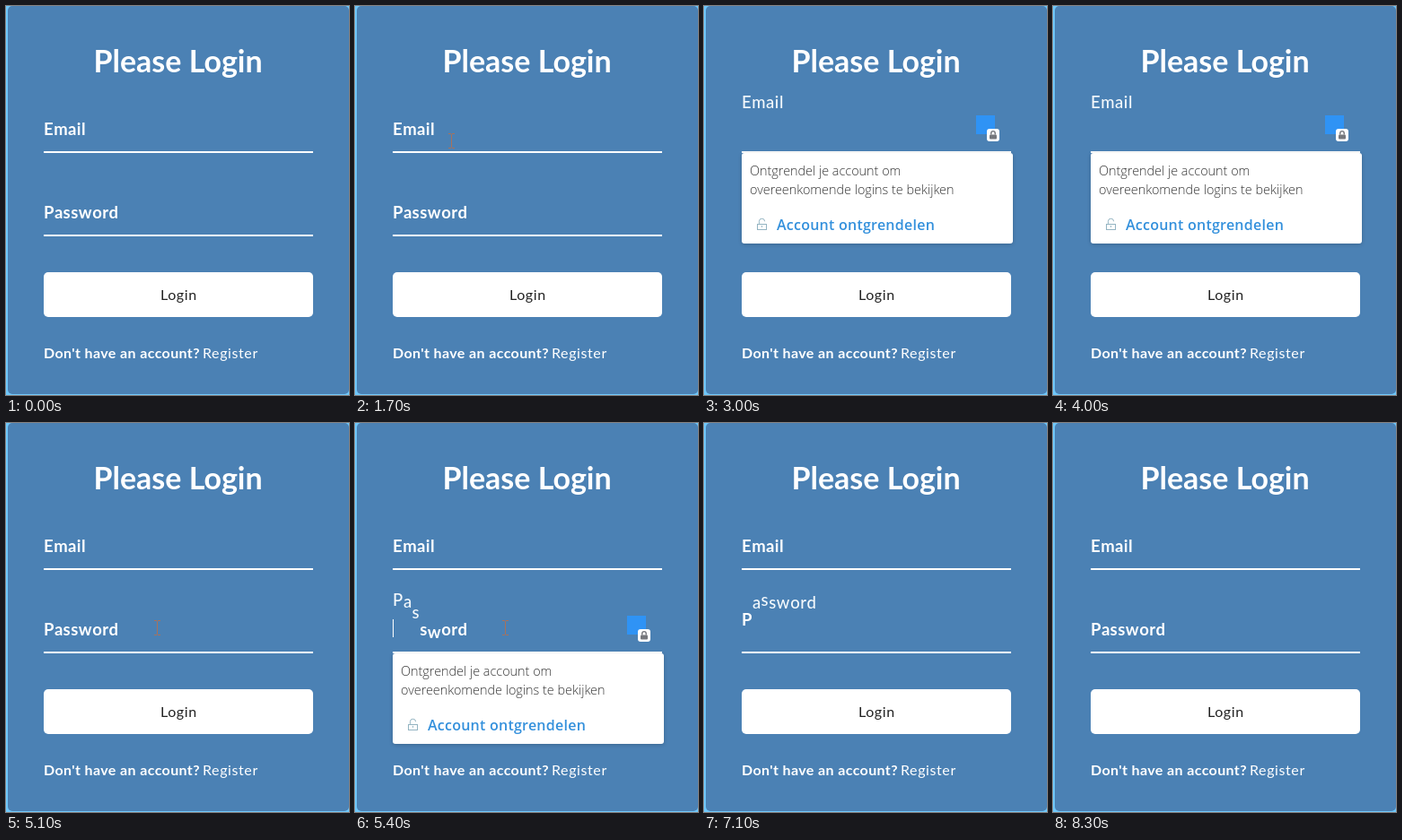
Recreate the animation shown at these times as an HTML page with a canvas. Size 382x434 px, loop 8.4 s.

```html
<!DOCTYPE html>
<html lang="en">
<head>
<meta charset="utf-8">
<title>Login form</title>
<style>
  html, body { margin: 0; width: 100%; height: 100%; overflow: hidden; background: #4b81b4; }
  canvas { display: block; }
</style>
</head>
<body>
<canvas id="stage" width="382" height="434"></canvas>
<script>
const ctx = document.getElementById('stage').getContext('2d', { alpha: false });
const LOOP = 8400;
const FORM_FONT = 'Lato, sans-serif';
const POPUP_FONT = '"Open Sans", sans-serif';

const fields = [
  { label: 'Email', top: 0, focus: 2320, blur: 4060 },
  { label: 'Password', top: 93, focus: 5150, blur: 6950 }
];

// Each pointer visit is a list of [time, x, y].
const pointerVisits = [
  [[1600, 122, 157], [1700, 107, 150], [1900, 100, 147], [2300, 88, 145], [2800, 88, 145]],
  [[4700, 190, 222], [5000, 168, 228], [5500, 167, 228]]
];

function bezier(a, b, u) {
  const v = 1 - u;
  return 3 * v * v * u * a + 3 * v * u * u * b + u * u * u;
}

function backEase(p) {
  if (p <= 0) return 0;
  if (p >= 1) return 1;
  let lo = 0, hi = 1;
  for (let i = 0; i < 20; i++) {
    const mid = (lo + hi) / 2;
    if (bezier(0.68, 0.265, mid) < p) lo = mid; else hi = mid;
  }
  return bezier(-0.55, 1.55, lo);
}

const isFocused = (field, t) => t >= field.focus && t < field.blur;

function text(str, x, y, font, color, spacing = 0) {
  ctx.font = font;
  ctx.letterSpacing = spacing + 'px';
  ctx.fillStyle = color;
  ctx.fillText(str, x, y);
}

function box(x, y, w, h, r, color) {
  ctx.fillStyle = color;
  ctx.beginPath();
  ctx.roundRect(x, y, w, h, r);
  ctx.fill();
}

function padlock(x, y, w, h, color, solid) {
  const bodyTop = y + h * 0.45;
  ctx.strokeStyle = color;
  ctx.lineWidth = solid ? 1.4 : 1;
  ctx.beginPath();
  ctx.moveTo(x + w * 0.22, bodyTop);
  ctx.lineTo(x + w * 0.22, y + w * 0.3);
  ctx.arc(x + w / 2, y + w * 0.3, w * 0.28, Math.PI, 0);
  if (solid) ctx.lineTo(x + w * 0.78, bodyTop);
  ctx.stroke();
  if (solid) {
    box(x, bodyTop, w, h * 0.55, 1, color);
  } else {
    ctx.strokeRect(x + 0.5, Math.round(bodyTop) + 0.5, w - 1, Math.round(h * 0.55) - 1);
    ctx.fillStyle = color;
    ctx.fillRect(x + w / 2 - 0.5, bodyTop + 2, 1, 2);
  }
}

function drawLabel(field, t) {
  const font = `bold 18.5px ${FORM_FONT}`;
  [...field.label].forEach((letter, i) => {
    ctx.font = font;
    ctx.letterSpacing = '0.5px';
    const x = 42 + ctx.measureText(field.label.slice(0, i)).width;
    const progress = start => backEase((t - start - i * 50) / 300);
    const lift = progress(field.focus) - progress(field.blur);
    const raised = lift > 0.5;
    text(letter, x, 144 + field.top - 30 * lift,
      raised ? font.replace('bold', '500') : font, raised ? '#f4f9fc' : '#fff');
  });
}

function drawField(field, t) {
  ctx.fillStyle = '#fff';
  ctx.fillRect(42, 162 + field.top, 300, 2);
  drawLabel(field, t);
  if (isFocused(field, t) && (t - field.focus) % 1000 < 500) {
    ctx.fillStyle = '#fff';
    ctx.fillRect(42, 126 + field.top, 1, 20);
  }
}

function drawPopup(field) {
  ctx.save();
  ctx.translate(0, field.top);
  box(303, 122, 21, 21, 0, '#2f93f5');
  box(315, 137, 14, 14, 3, '#fff');
  padlock(318, 139.5, 8, 9, '#75777c', true);

  ctx.shadowColor = 'rgba(0, 0, 0, 0.2)';
  ctx.shadowBlur = 4;
  ctx.shadowOffsetY = 1;
  box(42, 164, 302, 101, 3, '#fff');
  ctx.shadowColor = 'transparent';

  const bodyFont = `300 14.4px ${POPUP_FONT}`;
  text('Ontgrendel je account om', 51, 189, bodyFont, '#333');
  text('overeenkomende logins te bekijken', 51, 210, bodyFont, '#333');
  padlock(59, 237, 11, 13, '#93b4c2', false);
  text('Account ontgrendelen', 81, 250, `600 16px ${POPUP_FONT}`, '#3390dc', 0.25);
  ctx.restore();
}

function drawPointer(t) {
  for (const visit of pointerVisits) {
    const next = visit.findIndex(point => point[0] > t);
    if (next < 1) continue;
    const [t0, x0, y0] = visit[next - 1];
    const [t1, x1, y1] = visit[next];
    const k = (t - t0) / (t1 - t0);
    const x = Math.round(x0 + (x1 - x0) * k);
    const y = Math.round(y0 + (y1 - y0) * k);
    ctx.fillStyle = '#a9715a';
    ctx.fillRect(x, y - 7, 1, 15);
    for (const end of [y - 8, y + 8]) {
      ctx.fillRect(x - 3, end, 3, 1);
      ctx.fillRect(x + 1, end, 3, 1);
    }
  }
}

function draw(t) {
  ctx.fillStyle = '#70c9fb';
  ctx.fillRect(0, 0, 382, 434);
  box(2, 0, 380, 433, 5, '#4b81b4');

  text('Please Login', 97.5, 74, `bold 34px ${FORM_FONT}`, '#fff');
  fields.forEach(field => drawField(field, t));

  box(42, 297, 300, 50, 5, '#fff');
  text('Login', 172, 328, `16px ${FORM_FONT}`, '#222', 0.6);
  text("Don't have an account?", 42, 393, `bold 16px ${FORM_FONT}`, '#fff', 0.38);
  text('Register', 219, 393, `16px ${FORM_FONT}`, '#fff', 0.6);

  fields.filter(field => isFocused(field, t)).forEach(drawPopup);
  drawPointer(t);
}

const start = performance.now();
function tick() {
  draw((performance.now() - start) % LOOP);
  requestAnimationFrame(tick);
}
tick();
</script>
</body>
</html>
```
